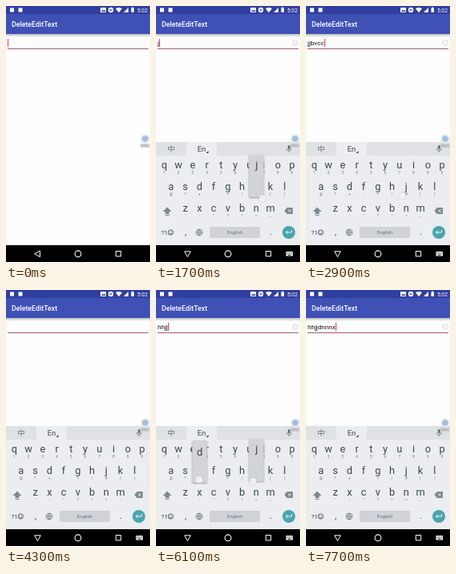
An HTML page with a canvas that plays this animation: 180x320 px, repeating every 8 s.

```html
<!DOCTYPE html>
<html lang="en">
<head>
<meta charset="utf-8">
<title>DeleteEditText</title>
<style>
html, body { margin: 0; width: 100%; height: 100%; overflow: hidden; background: #fdfdfd; }
canvas { display: block; width: 180px; height: 320px; }
</style>
</head>
<body>
<canvas id="stage"></canvas>
<script>
const LOOP = 8000, STEP = 100, CLEAR = 4100, SLIDE = 300;
const canvas = document.getElementById('stage');
const scale = window.devicePixelRatio || 1;
canvas.width = 180 * scale;
canvas.height = 320 * scale;
const c = canvas.getContext('2d');

const rows = [
  { keys: 'qwertyuiop', hints: '1234567890', x: 10.3, y: 202.5 },
  { keys: 'asdfghjkl', hints: '@*+-=/#()', x: 18.8, y: 229.5 },
  { keys: 'zxcvbnm', hints: '\':"?!~…', x: 36.6, y: 257 }
];
const PITCH = 17.75;

// time of press, key, finger offset from the key
const presses = [
  [1610, 'j', 8, 3], [1880, 'j', -3, 1], [2110, 'b', 2, 1], [2290, 'v', 1, 2],
  [2450, 'c', 2, 0], [2650, 'c', 0, 1], [2895, 'j', -5, 0], [3050, 'n', -2, 1],
  [3180, 'b', 0, 2], [3310, 'h', 2, 1],
  [5510, 'h', 3, 1], [5660, 'h', 2, 0], [5790, 'j', -3, 1], [5920, 'j', -4, 1.5],
  [6050, 'd', -.5, -.5], [6180, 'n', -2, 1], [6310, 'n', -1, 0], [6450, 'n', 0, 1],
  [6590, 'x', 1, 1]
];
const blinks = [[500, 1100], [1400, 1700], [4300, 4600], [5100, 5600], [7200, 7700]];

const within = (t, a, b) => t >= a && t < b;
const clamp = v => Math.max(0, Math.min(1, v));
const slideOffset = t => 110 * (1 - clamp((t - SLIDE) / 500)) ** 3;

function keyPlace(ch) {
  const row = rows.find(r => r.keys.includes(ch));
  return [row.x + row.keys.indexOf(ch) * PITCH, row.y];
}
function rect(x, y, w, h, color, r = 0) {
  c.fillStyle = color;
  c.beginPath();
  c.roundRect(x, y, w, h, r);
  c.fill();
}
function disc(x, y, r, color) {
  c.fillStyle = color;
  c.beginPath();
  c.arc(x, y, r, 0, 7);
  c.fill();
}
function text(s, x, y, size, color, align = 'center', weight = 400) {
  c.font = `${weight} ${size}px Roboto, "Noto Sans CJK SC", "Noto Sans CJK", sans-serif`;
  c.textAlign = align;
  c.fillStyle = color;
  c.fillText(s, x, y);
}
function fillPath(d, color) {
  c.fillStyle = color;
  c.fill(new Path2D(d));
}
function line(d, color, width = 1) {
  c.strokeStyle = color;
  c.lineWidth = width;
  c.stroke(new Path2D(d));
}
const ring = (x, y, r) => `M${x - r} ${y}a${r} ${r} 0 1 0 ${2 * r} 0a${r} ${r} 0 1 0 ${-2 * r} 0`;

function header() {
  const g = c.createLinearGradient(0, 35, 0, 39);
  g.addColorStop(0, 'rgba(0,0,0,.25)');
  g.addColorStop(1, 'rgba(0,0,0,0)');
  rect(0, 35, 180, 4, g);
  rect(0, 0, 180, 10, '#303f9f');
  rect(0, 10, 180, 25, '#3f51b5');
  text('DeleteEditText', 7, 26, 8.8, '#fff', 'left', 500);
  rect(5, 2.5, 5, 5, '#fff');
  rect(15.5, 2.5, 5, 5, '#fff');
  rect(118, 2, 7, 6, '#fff', .7);
  fillPath('M119 7l1.7-2.2 1.2 1.2 1.2-1.6 1.4 2.6z', '#303f9f');
  disc(131, 5, 3.2, '#fff');
  rect(129.2, 4.4, 3.6, 1.2, '#303f9f');
  fillPath('M137 3.3q4-2.6 8 0l-4 5z', '#fff');
  fillPath('M147 8l6-6v6z', '#fff');
  rect(156.5, 2.3, 3.5, 5.7, '#fff', .4);
  rect(157.4, 1.6, 1.7, 1, '#fff');
  text('5:02', 177, 7.6, 6.8, '#fff', 'right');
}

function field(t) {
  const start = t >= CLEAR ? CLEAR : 0;
  const value = presses
    .filter(p => p[0] >= start && t - p[0] >= 80)
    .map(p => p[1]).join('');
  rect(2, 53, 176, 1, '#a35a70');
  text(value, 2, 49, 8.1, '#111', 'left');
  if (!blinks.some(b => within(t, ...b)))
    rect(Math.round(2 + c.measureText(value).width), 41, 1, 10, '#e8336f');
  if (value) {
    disc(174.2, 45.8, 3.6, '#f3f3f3');
    line(ring(174.2, 45.8, 3.4), '#dcdcdc', .8);
  }
}

function keyboard(t) {
  if (t < SLIDE) return;
  const ink = '#37474f', soft = '#65737a', base = '#ebedf0';
  c.save();
  c.globalAlpha = clamp(.1 + (t - SLIDE) / 400);
  c.translate(0, slideOffset(t));
  rect(0, 170, 180, 130, base);
  rect(0, 170, 180, 17, '#dfe2e4');
  rect(38, 170, 38, 17, base);
  text('中', 19, 182.4, 9.5, soft);
  text('En', 57, 182, 9.5, ink);
  fillPath('M65.5 181v3h-3z', ink);

  // microphone
  rect(164.8, 174, 3, 5.3, soft, 1.5);
  line('M163.4 178a2.9 2.9 0 0 0 5.8 0M166.3 181v2', soft, .8);

  for (const row of rows) {
    [...row.keys].forEach((k, i) => {
      const x = row.x + i * PITCH;
      text(k, x, row.y, 12.8, ink);
      text(row.hints[i], x, row.y + 7, 4.5, soft);
    });
  }
  fillPath('M14 251.5l5.5 5.5h-3v3h-5v-3h-3z', '#7c898f');
  rect(11.5, 261, 5, 1, '#7c898f');
  fillPath('M160.5 256l3.2-4h7.3v8h-7.3z', '#7c898f');
  line('M165.2 254.2l3.6 3.6m0-3.6l-3.6 3.6', base, .9);

  text('?1', 6.5, 286, 8, ink, 'left');
  line(ring(18.3, 283, 3.2) + 'M16.5 284q1.8 2 3.6 0', ink, .8);
  disc(17.1, 282, .5, ink);
  disc(19.5, 282, .5, ink);
  text(',', 37, 286, 11, ink);
  line(ring(54, 283, 4) + 'M50 283h8M54 279v8M54 279q-4 4 0 8q4-4 0-8', soft, .7);
  rect(67, 276, 63, 14, '#cfd3d7', 1);
  text('English', 98.5, 285.2, 6, soft);
  text('.', 143.5, 286, 11, ink);
  disc(166, 283, 8, '#4aa5ad');
  line('M169.5 280v3h-7m2.3-2.3l-2.3 2.3 2.3 2.3', '#fff', .9);
  c.restore();
}

function touch(x, y) {
  disc(x, y, 5, 'rgba(110,120,125,.3)');
  disc(x, y, 4.5, 'rgba(248,248,248,.85)');
}

function popups(t) {
  const active = presses.filter(p => within(t - p[0], 0, 200));
  for (const [at, ch] of active) {
    if (t - at < 10) continue;
    const [x, y] = keyPlace(ch);
    const rise = t - at < 70 ? 2 : 0;
    const top = y - 43.5 + rise;
    c.save();
    c.shadowColor = 'rgba(0,0,0,.35)';
    c.shadowBlur = 2 * scale;
    c.shadowOffsetY = scale;
    rect(x - 9, top, 18.5, 53, '#d3d4d7', 1.5);
    c.restore();
    text(ch, x + .4, top + 17 + rise, 13, '#37474f');
  }
  for (const [, ch, dx, dy] of active) {
    const [x, y] = keyPlace(ch);
    touch(x + dx, y + 8 + dy);
  }
  if (within(t, 100, 300)) touch(136, 46);
  if (within(t, 3900, 4200)) touch(173, 46);
}

function floater() {
  disc(174, 166, 5.6, '#dbe3ea');
  disc(174, 166, 4.6, '#f0f4f7');
  disc(174, 166, 3.8, '#a3bfda');
  rect(168, 172, 11.5, 5, 'rgba(200,202,204,.8)', .8);
  text('0.0K/s', 173.8, 175.8, 3.4, '#999');
}

function navBar(t) {
  // the black strip rises with the keyboard, over a grey one
  const drop = t < SLIDE ? 0 : Math.min(21, slideOffset(t));
  rect(0, 299, 180, 21, '#b9b9b9');
  rect(0, 299 + drop, 180, 21 - drop, '#000');
  const turn = clamp((t - SLIDE) / 200);
  c.save();
  c.translate(39.5, 309.8);
  c.rotate(-turn * Math.PI / 2);
  line('M-3.8 0L3-3.8V3.8z', '#fff');
  c.restore();
  line(ring(90, 309.8, 3.9), '#fff', 1.1);
  line('M137.3 306.5h6.4v6.4h-6.4z', '#fff');
  if (turn > 0) {
    rect(162.5, 307, 8.5, 5.5, '#fff', .6);
    for (let i = 0; i < 4; i++) {
      rect(163.6 + i * 1.8, 308.2, .9, .9, '#000');
      rect(163.6 + i * 1.8, 309.6, .9, .9, '#000');
    }
    rect(165, 311, 3.5, .7, '#000');
  }
}

function draw(now) {
  const t = Math.floor((now % LOOP) / STEP) * STEP;
  c.setTransform(scale, 0, 0, scale, 0, 0);
  rect(0, 0, 180, 320, '#fdfdfd');
  header();
  field(t);
  keyboard(t);
  popups(t);
  floater();
  navBar(t);
}
const begin = performance.now();
function play() {
  draw(performance.now() - begin);
  requestAnimationFrame(play);
}
play();
</script>
</body>
</html>
```
